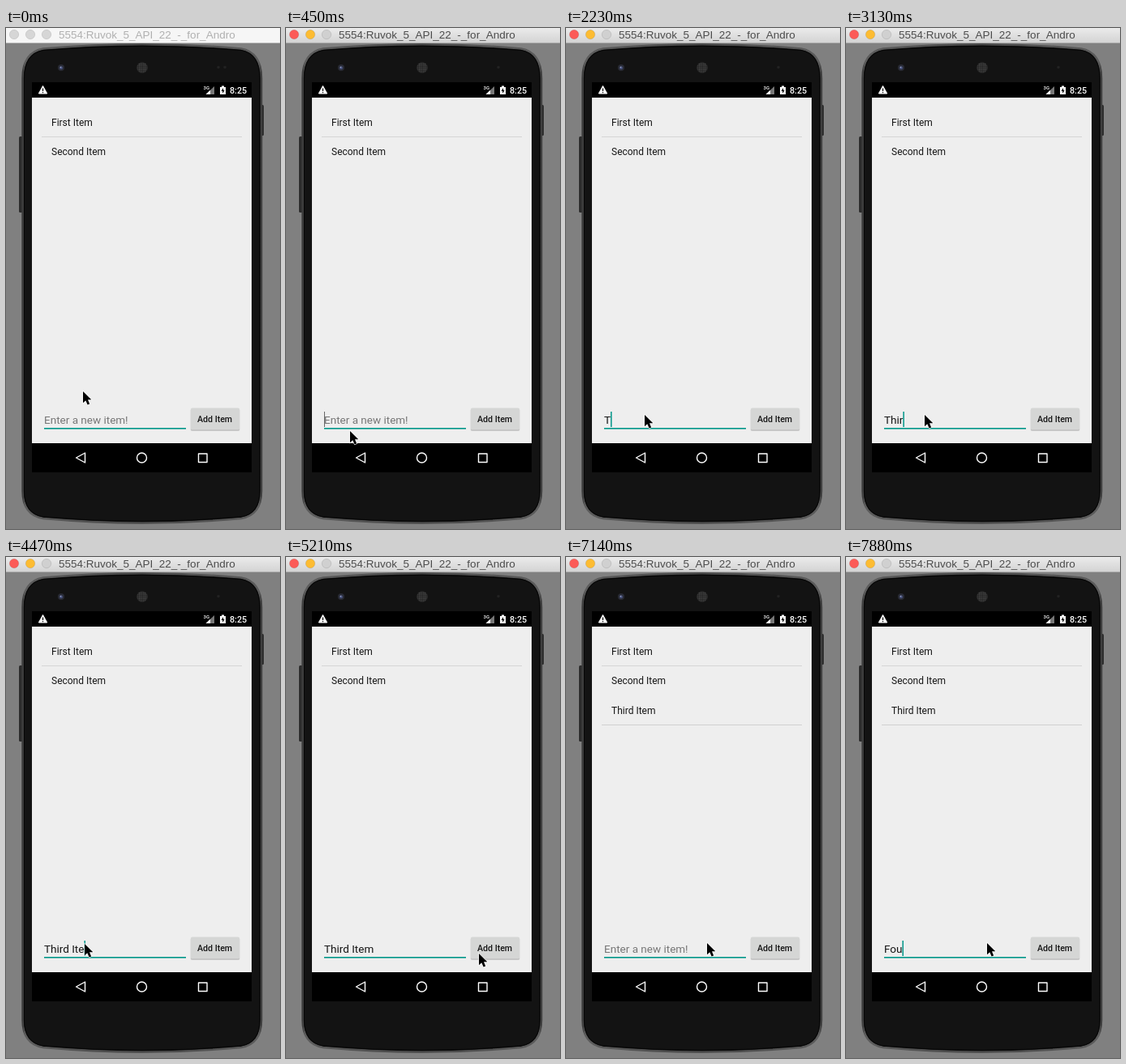
Write an HTML page that moves like this. It is 338 px wide and 619 px high and loops after 8 s.

```html
<!DOCTYPE html>
<html lang="en">
<head>
<meta charset="utf-8">
<title>Item list</title>
<style>
  html, body { margin: 0; width: 100%; height: 100%; overflow: hidden; background: #808080; }
  svg { display: block; width: 338px; height: 619px; }
  text { font-family: Roboto, sans-serif; white-space: pre; }
  .item { font-size: 12px; fill: #161616; }
  .field { font-size: 13.5px; }
  .medium { font-weight: 500; }
  #title { font: 13.5px "Liberation Sans", Arial, sans-serif; }
</style>
</head>
<body>
<svg viewBox="0 0 338 619">
  <defs>
    <linearGradient id="active" x2="0" y2="1">
      <stop stop-color="#ebebeb"/><stop offset="1" stop-color="#d3d3d3"/>
    </linearGradient>
    <linearGradient id="rim">
      <stop stop-color="#3c3c3c"/><stop offset=".01" stop-color="#5c5c5c"/>
      <stop offset=".5" stop-color="#484848"/>
      <stop offset=".99" stop-color="#5c5c5c"/><stop offset="1" stop-color="#3c3c3c"/>
    </linearGradient>
    <pattern id="grille" width="2.4" height="2.4" patternUnits="userSpaceOnUse">
      <circle cx="1.2" cy="1.2" r=".75" fill="#555"/>
    </pattern>
  </defs>

  <rect width="338" height="619" fill="#808080"/>

  <!-- phone -->
  <rect x="16" y="134" width="5" height="94" rx="1.5" fill="#2c2c2c"/>
  <rect x="314" y="95" width="4" height="38" rx="1.5" fill="#2c2c2c"/>
  <path id="body" fill="#131313" stroke="url(#rim)" stroke-width="2.5"
    d="M20.5 62Q20.5 30 46 25.500Q168 15 290 25.500Q315 30 315 62V572Q315 602 290 606Q168 617 46 606Q20.500 602 20.500 572Z"/>
  <path fill="none" stroke="#050505" stroke-width="1"
    d="M22.500 62Q22.500 32 46 27.500Q168 17 290 27.500Q313 32 313 62V572Q313 600 290 604Q168 615 46 604Q22.500 600 22.500 572Z"/>
  <circle cx="68" cy="49" r="4" fill="#292b35"/>
  <circle cx="68" cy="49.300" r="2" fill="#46507a"/>
  <circle cx="67.500" cy="48.500" r=".8" fill="#a3adcc"/>
  <circle cx="168" cy="49" r="7" fill="#202020"/>
  <circle cx="168" cy="49" r="6.500" fill="url(#grille)"/>
  <circle cx="262" cy="48.500" r="1.800" fill="#222"/>
  <circle id="sensor" cx="270" cy="48.500" r="1.800" fill="#222"/>

  <!-- screen -->
  <rect x="32" y="67" width="271" height="482"/>
  <rect x="32" y="86" width="271" height="427" fill="#eee"/>

  <!-- status bar -->
  <path d="M45.500 71.500L50.700 81H40.300Z" fill="#fff" stroke="#fff" stroke-linejoin="round"/>
  <path d="M45.500 74.500V78M45.500 79V80.300" stroke="#000" stroke-width="1.200"/>
  <path d="M257 72V82H246.500Z" fill="#777"/>
  <path d="M252 76.800V82H246.500Z" fill="#fff"/>
  <text x="243.500" y="76.300" font-size="6" class="medium" fill="#fff">3G</text>
  <path d="M264 73H266V71.500H269V73H271V82H264Z" fill="#fff"/>
  <path d="M268 74L265.500 78H267.200V81L269.700 76.800H268Z"/>
  <text x="276" y="80.700" font-size="10.700" class="medium" fill="#fff">8:25</text>

  <!-- list -->
  <text class="item" x="56" y="120.500">First Item</text>
  <rect x="44" y="134" width="247" height="1" fill="#d5d5d5"/>
  <text class="item" x="56" y="157">Second Item</text>
  <g id="third">
    <text class="item" x="56" y="193.500">Third Item</text>
    <rect x="44" y="207" width="247" height="1" fill="#d0d0d0"/>
  </g>

  <!-- form -->
  <text id="hint" class="field" x="47" y="489" fill="#777">Enter a new item!</text>
  <text id="value" class="field" x="47" y="489" fill="#161616"></text>
  <rect x="47" y="494" width="175" height="1.600" fill="#009688"/>
  <rect id="caret" y="474" height="19"/>
  <rect x="227.500" y="470.500" width="61" height="27.500" rx="2" fill="#000" opacity=".09"/>
  <rect x="228" y="470.500" width="60" height="27" rx="1.500" fill="#000" opacity=".16"/>
  <rect id="button" x="228" y="469.500" width="60" height="27" rx="1.500"/>
  <text class="medium" x="236" y="487" font-size="10.600" fill="#161616">Add Item</text>

  <!-- navigation -->
  <g fill="none" stroke="#fff" stroke-width="1.400" stroke-linejoin="round">
    <path d="M97.500 525V537L86.500 531Z"/>
    <circle cx="167.500" cy="531" r="6"/>
    <rect x="237.500" y="526" width="10.500" height="10.500"/>
  </g>

  <!-- window bar -->
  <rect id="bar" width="338" height="18.500"/>
  <g stroke="#000" stroke-opacity=".1">
    <circle class="light" cx="10" cy="8" r="5.700"/>
    <circle class="light" cx="30" cy="8" r="5.700"/>
    <circle class="light" cx="50" cy="8" r="5.700"/>
  </g>
  <text id="title" x="65" y="13">5554:Ruvok_5_API_22_-_for_Andro</text>

  <path id="pointer" d="M0 0V14.200L3.300 11.200L5.600 16.500L8.200 15.400L6 10.300H10.300Z"
    stroke="#fff" stroke-width="1.200" paint-order="stroke"/>
</svg>
<script>
const LOOP = 8000;
const el = id => document.getElementById(id);
const lights = document.querySelectorAll('.light');

const pointer = [
  [0, [95, 449]], [150, [89, 468]], [300, [80, 496]], [450, [79, 498]],
  [890, [86, 490]], [1040, [97, 478]],
  [4910, [118, 480]], [5060, [182, 486]], [5210, [238, 490]], [5360, [249, 489]],
  [5650, [236, 487]], [5800, [193, 482]], [5950, [181, 479]], [6100, [174, 477]]
];
const typed = [
  [0, ''], [2230, 'T'], [2680, 'Th'], [2980, 'Thi'], [3130, 'Thir'], [3430, 'Third'],
  [3720, 'Third '], [4170, 'Third I'], [4320, 'Third It'], [4470, 'Third Ite'],
  [4620, 'Third Item'], [5510, ''], [7440, 'F'], [7580, 'Fo'], [7880, 'Fou']
];
const caret = [
  [0, 0], [450, 1], [890, 0], [1490, 1], [1930, 0], [2230, 1],
  [5210, 0], [5510, 1], [6100, 0], [6550, 1], [7140, 0], [7440, 1]
];

// value of the last step that has begun
const at = (steps, t) => steps.filter(s => s[0] <= t).pop()[1];

const set = (node, attrs) => {
  for (const name in attrs) node.setAttribute(name, attrs[name]);
};
const show = (id, on) => { el(id).style.display = on ? '' : 'none'; };

function draw(t) {
  const focused = t >= 150;
  set(el('bar'), { fill: focused ? 'url(#active)' : '#f6f6f6' });
  set(el('title'), { fill: focused ? '#4c4c4c' : '#b0b0b0' });
  const colors = focused ? ['#fc5b57', '#fdbc32', '#d0d0d0'] : ['#d6d6d6', '#d6d6d6', '#d6d6d6'];
  lights.forEach((light, i) => set(light, { fill: colors[i] }));
  show('sensor', !focused);

  const text = at(typed, t);
  el('value').textContent = text;
  show('hint', !text);
  show('third', t >= 5510);

  const width = text ? el('value').getComputedTextLength() : 0;
  set(el('caret'), {
    x: 47 + width,
    width: text ? 1.5 : 1,
    fill: text ? '#009688' : '#666'
  });
  show('caret', at(caret, t));

  const pressed = t >= 5360 && t < 5650;
  set(el('button'), { fill: pressed ? '#c6c8c7' : '#d5d6d5' });
  set(el('pointer'), { transform: `translate(${at(pointer, t)})` });
}

const start = performance.now();
function tick() {
  draw((performance.now() - start) % LOOP);
  requestAnimationFrame(tick);
}
tick();
</script>
</body>
</html>
```
